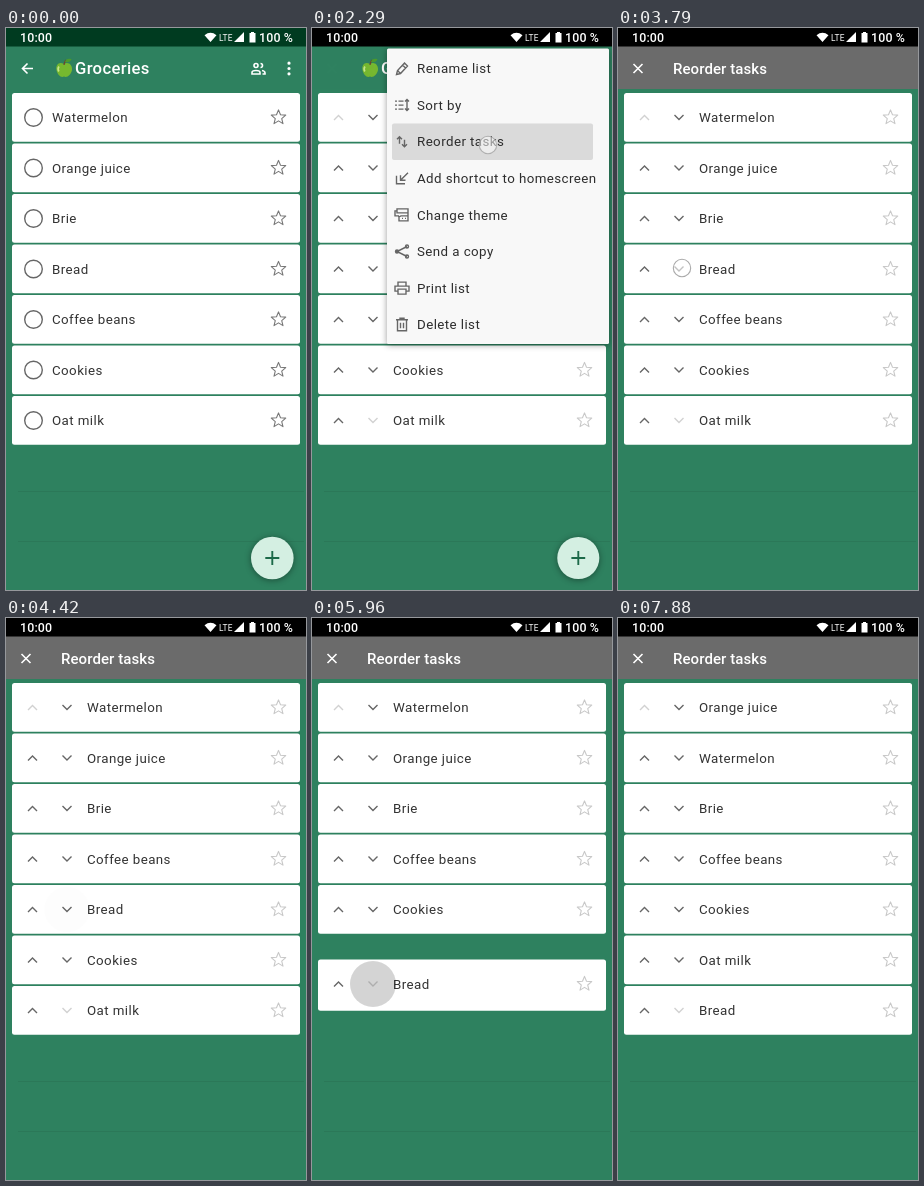
Recreate the animation shown at these times as an HTML page. Size 300 px wide and 562 px high, loop 8000 ms.

```html
<!DOCTYPE html>
<html lang="en">
<head>
<meta charset="utf-8">
<title>Reorder tasks</title>
<style>
  html, body { margin: 0; height: 100%; overflow: hidden; background: #2e815f; }
  svg { display: block; width: 100vw; height: 100vh; font: 13.33px Roboto, sans-serif; letter-spacing: .42px; }
  .line { fill: none; stroke: #666; stroke-width: 1.4; }
  .white { fill: none; stroke: #fff; stroke-width: 1.6; }
  .status { font-weight: 500; font-size: 12.4px; letter-spacing: .15px; fill: #fff; }
  .title { font-weight: 500; fill: #fff; }
  .shadow { filter: drop-shadow(0 1px 3px rgba(0, 0, 0, .4)); }
</style>
</head>
<body>
<svg viewBox="0 0 300 562">
  <defs>
    <clipPath id="menuClip"><rect id="menuWindow"/></clipPath>
  </defs>
  <rect width="300" height="562" fill="#2e815f"/>
  <path d="M12 463.5H298M12 513.5H298" stroke="#000" stroke-opacity=".07"/>

  <g id="listHeader">
    <path id="back" class="white" d="M27 40.5H17M21.5 35.5L16.5 40.5L21.5 45.5"/>
    <g id="apple">
      <path d="M58 36C53 33 49.500 37 50.500 42C51.500 47 55 50 58 48.500C61 50 65 47 66 42C66.500 36.500 62 33.500 58 36Z" fill="#76b82f"/>
      <path d="M53 38.500C51.800 40 52 42 52.800 43.500" stroke="#c5e58a" stroke-width="1.700" fill="none"/>
      <path d="M58 37Q58.500 34 60 32" stroke="#70452b" stroke-width="1.300" fill="none"/>
      <path d="M59 34Q60 29.500 65.500 31Q64 35 59 34Z" fill="#4b9a2c"/>
    </g>
    <text class="title" x="69" y="46.300" font-size="16.670" letter-spacing=".33">Groceries</text>
    <g class="white" stroke-width="1.400">
      <circle cx="250" cy="37.500" r="2"/>
      <path d="M246 46V44.500Q246 42.500 250 42.500T254 44.500V46ZM254.500 35.500A2 2 0 0 1 254.500 39.500M256 42.500Q259 43 259 45V46H256.500"/>
    </g>
    <path d="M283 35.200v0M283 40.500v0M283 45.800v0" stroke="#fff" stroke-width="3.200" stroke-linecap="round"/>
  </g>

  <g id="editHeader">
    <rect y="18" width="300" height="43" fill="#6b6b6b"/>
    <path class="white" d="M15.500 36L24.500 45M24.500 36L15.500 45"/>
    <text class="title" x="55" y="46" font-size="15" style="letter-spacing:.08px">Reorder tasks</text>
  </g>

  <rect id="statusBar" width="300" height="18.500"/>
  <text class="status" x="14" y="14">10:00</text>
  <path d="M198.500 7.200Q204.500 2.500 210.500 7.200L204.500 14ZM238 4V14H228ZM243.500 5H245V4H248V5H249.500V14.500H243.500Z" fill="#fff"/>
  <text class="status" x="213" y="12.500" style="font-size:8.400px;font-weight:400">LTE</text>
  <text class="status" x="253" y="14">100 %</text>

  <g id="rows"></g>
  <circle id="ripple" r="23"/>

  <g id="fab">
    <circle class="shadow" r="21.300" fill="#d4efe2"/>
    <path d="M-7 0H7M0-7V7" stroke="#1c6a49" stroke-width="1.900"/>
  </g>

  <g id="menu">
    <rect id="menuBack" class="shadow" rx="1.500" fill="#f8f8f8"/>
    <g clip-path="url(#menuClip)">
      <g id="menuItems">
        <rect id="pressed" y="95.500" height="36.500" rx="2" fill="#dadada"/>
      </g>
    </g>
  </g>
  <circle id="touch" r="8.700" fill="#fff" fill-opacity=".6" stroke="#aaa" stroke-width="1.100"/>
</svg>

<script>
const $ = id => document.getElementById(id);

function add(parent, tag, attrs, text) {
  const node = document.createElementNS('http://www.w3.org/2000/svg', tag);
  set(node, attrs);
  if (text) node.textContent = text;
  return parent.appendChild(node);
}
function set(node, attrs) {
  for (const key in attrs) node.setAttribute(key, attrs[key]);
}

const ramp = (t, from, to) => Math.min(1, Math.max(0, (t - from) / (to - from)));
const easeOut = u => 1 - (1 - u) ** 3;
const easeInOut = u => (1 - Math.cos(Math.PI * u)) / 2;
const move = (x, y) => `translate(${x} ${y})`;
const slotY = slot => 89.5 + 50.5 * slot;

const LOOP = 8000, MOVE_DELAY = 300, MOVE_TIME = 250, EDIT_START = 2230;

// Later rows paint over earlier ones.
const rows = [['Watermelon', 0], ['Orange juice', 1], ['Brie', 2], ['Coffee beans', 4],
  ['Cookies', 5], ['Oat milk', 6], ['Bread', 3]].map(([name, slot]) => makeRow(name, slot));

const swaps = [
  { time: 3790, name: 'Bread', step: 1 },
  { time: 4750, name: 'Bread', step: 1 },
  { time: 5540, name: 'Bread', step: 1 },
  { time: 6750, name: 'Orange juice', step: -1 },
];

const menuEntries = [
  ['Rename list', 'M-5.500 6L-4.500 2L2.500-5.500L5.500-2.500L-1.500 5ZM.5-3.500L3.500-.5M-4.500 2L-1.500 5'],
  ['Sort by', 'M-7-4H-5M-3.500-4H1.500M-7 0H-5M-3.500 0H1.500M-7 4H-5M-3.500 4H1.500M5-5.500V5.500M3-3.500L5-5.500L7-3.500M3 3.500L5 5.500L7 3.500'],
  ['Reorder tasks', 'M-2.500 2V-5M-5-2.500L-2.500-5L0-2.500M2.500-2V5M0 2.500L2.500 5L5 2.500'],
  ['Add shortcut to homescreen', 'M6-5.500L-1.500 2M-1.500-3V2H3.500M-5.500-2.500V5.500H3'],
  ['Change theme', 'M-5-6H6V-2H-5ZM-5-4H-7V1H-3M6-2V1M-1 1H6V6H-3V2ZM0 3.500H1M3 3.500H4'],
  ['Send a copy', 'M5-5L-5 0L5 5M3.500-5a1.500 1.500 0 1 0 3 0a1.500 1.500 0 1 0-3 0M-6.500 0a1.500 1.500 0 1 0 3 0a1.500 1.500 0 1 0-3 0M3.500 5a1.500 1.500 0 1 0 3 0a1.500 1.500 0 1 0-3 0'],
  ['Print list', 'M-4-2V-6H4V-2M-4 3H-7V-2H7V3H4M-4 1H4V6H-4Z'],
  ['Delete list', 'M-6-5H6M-2-5V-6.500H2V-5M-4.500-5V6H4.500V-5M-1.500-2V3.500M1.500-2V3.500'],
];
menuEntries.forEach(([label, icon], i) => {
  const y = 40.5 + 36.6 * i;
  add($('menuItems'), 'path', { class: 'line', d: icon, transform: move(90, y) });
  add($('menuItems'), 'text', { x: 105, y: y + 4.7, fill: '#2d2d2d' }, label);
});

function makeRow(name, slot) {
  const group = add($('rows'), 'g', {});
  add(group, 'rect', { x: 6, y: -24.4, width: 288, height: 48.7, rx: 2.5, fill: '#fff' });
  const star = Array.from({ length: 10 }, (_, i) => {
    const angle = Math.PI * (i / 5 - .5), radius = i % 2 ? 3.4 : 7.6;
    return `${272.5 + radius * Math.cos(angle)},${radius * Math.sin(angle)}`;
  }).join(' ');
  return {
    name, slot, group,
    check: add(group, 'circle', { class: 'line', cx: 27.5, r: 8.8 }),
    up: add(group, 'path', { class: 'line', d: 'M22 2.500L26.500-2L31 2.500' }),
    down: add(group, 'path', { class: 'line', d: 'M56.500-2.500L61 2L65.500-2.500' }),
    label: add(group, 'text', { y: 4.7, fill: '#333' }, name),
    star: add(group, 'polygon', { points: star, fill: 'none', 'stroke-width': 1.1, 'stroke-linejoin': 'round' }),
  };
}

function drawRows(t) {
  const editing = t >= EDIT_START;
  const state = new Map(rows.map(row => [row.name, { slot: row.slot, y: slotY(row.slot) }]));
  for (const { time, name, step } of swaps) {
    const start = time + MOVE_DELAY;
    if (t < start) break;
    const mover = state.get(name);
    const other = [...state.values()].find(s => s.slot === mover.slot + step);
    const shift = 50.5 * step * easeInOut(ramp(t, start, start + MOVE_TIME));
    mover.slot += step;
    other.slot -= step;
    mover.y += shift;
    other.y -= shift;
  }
  for (const row of rows) {
    const { slot, y } = state.get(row.name);
    set(row.group, { transform: move(0, y) });
    set(row.check, { opacity: editing ? 0 : 1 });
    set(row.up, { opacity: editing ? (slot === 0 ? .3 : 1) : 0 });
    set(row.down, { opacity: editing ? (slot === 6 ? .3 : 1) : 0 });
    set(row.label, { x: editing ? 81 : 46 });
    set(row.star, { stroke: editing ? '#c8c8c8' : '#777' });
  }
  return state;
}

function drawTaps(t, state) {
  const swap = swaps.findLast(s => t >= s.time);
  let tap = { time: 40, x: 283, y: 40.5, dotY: 40.5, color: '#fff' };
  if (swap) {
    const { slot, y } = state.get(swap.name);
    const pressedSlot = t < swap.time + MOVE_DELAY ? slot : slot - swap.step;
    tap = { time: swap.time, x: swap.step > 0 ? 61 : 26.5, y, dotY: slotY(pressedSlot) - 1, color: '#000' };
  } else if (t >= 1630) {
    tap = { time: 1630, x: 173, y: 0, dotY: 117, color: 'none' };
  }
  const age = t - tap.time;
  const hold = tap.color === 'none' ? 400 : 0;
  set($('touch'), {
    cx: tap.x + 3, cy: tap.dotY,
    opacity: age < 0 ? 0 : 1 - ramp(age, 200 + hold, 300 + hold * 2),
  });
  set($('ripple'), {
    cx: tap.x, cy: tap.y, fill: tap.color,
    r: 8 + 15 * easeOut(ramp(age, 160, 340)),
    opacity: .17 * ramp(age, 160, 260) * (1 - ramp(age, 430, 640)),
  });
}

function drawMenu(t) {
  const open = easeOut(ramp(t, 330, 580)), rest = 1 - open;
  const frame = { x: 75 + 222 * rest, y: 20.5, width: 222 * open, height: 295.5 * open };
  set($('menuBack'), frame);
  set($('menuWindow'), frame);
  set($('menuItems'), { transform: move(95 * rest, -150 * rest) });
  set($('menu'), { opacity: ramp(t, 330, 400) * (1 - ramp(t, 2300, 2480)) });
  const half = 100.5 * easeOut(ramp(t, 1790, 2200));
  set($('pressed'), { x: 180.5 - half, width: 2 * half });
}

function draw(now) {
  const t = now % LOOP, editing = t >= EDIT_START;
  set($('statusBar'), { fill: editing ? '#000' : '#003b20' });
  set($('back'), { opacity: editing ? 0 : 1 });
  set($('editHeader'), { opacity: ramp(t, 2290, 2480) });
  const scale = 1 - ramp(t, 2275, 2420) ** 2;
  set($('fab'), { transform: `${move(266.3, 530)} scale(${scale})` });
  drawTaps(t, drawRows(t));
  drawMenu(t);
  requestAnimationFrame(() => draw(performance.now()));
}
draw(0);
</script>
</body>
</html>
```
